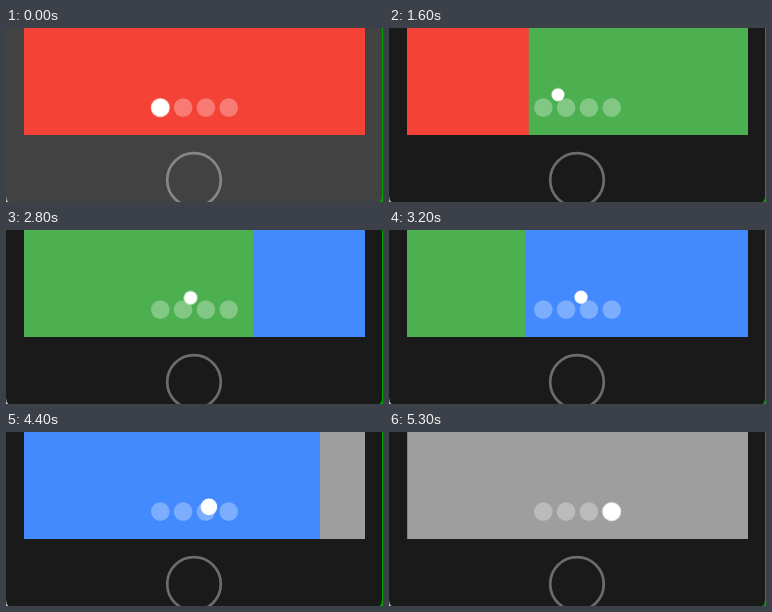
Animation of 377x174 px, one loop 5400 ms. Source, as an HTML page:

```html
<!DOCTYPE html>
<html lang="en">
<head>
<meta charset="utf-8">
<title>Page indicator</title>
<style>
  html, body { margin: 0; width: 100%; height: 100%; overflow: hidden; background: #1a1a1a; }
  svg { display: block; width: 377px; height: 174px; }
  #soft { filter: blur(.45px); }
</style>
</head>
<body>
<svg viewBox="0 0 377 174">
  <defs><clipPath id="screen"><rect x="18" y="-5" width="341" height="112"/></clipPath></defs>
  <rect width="188" height="174" fill="#c4c4c4"/>
  <rect x="188" width="189" height="174" fill="#00a400"/>
  <path id="body" d="M0 0H376V168Q376 172 373.5 174H2.5Q0 172 0 168Z" fill="#1a1a1a"/>
  <g id="soft">
    <g clip-path="url(#screen)"><g id="pages"></g></g>
    <g id="dots" fill="#fff" fill-opacity=".3"></g>
    <circle id="active" r="9.3" fill="#fff"/>
    <circle id="home" cx="188" cy="152" r="26.8" fill="none" stroke="#6c6c6c" stroke-width="2.7"/>
  </g>
</svg>
<script>
const LOOP = 5400, STEP = 100;
const PAGE_WIDTH = 341, DOT_X = 154.3, DOT_Y = 79.6, DOT_GAP = 22.8;
const LIFT = 18, SHRINK = 0.42;
const COLORS = ['#f44336', '#4caf50', '#448aff', '#9e9e9e'];

// Each swipe drags steadily up to `reach`, then settles on the next page.
const SWIPES = [
  { start: 665, release: 1600, reach: .643, end: 2000 },
  { start: 2396, release: 3200, reach: .654, end: 3800 },
  { start: 4190, release: 4900, reach: .447, end: 5330 }
];

const byId = id => document.getElementById(id);
const progress = (t, from, to) => Math.min(1, Math.max(0, (t - from) / (to - from)));
const easeOut = u => 1 - (1 - u) ** 2;

function add(parent, tag, attrs) {
  const el = document.createElementNS('http://www.w3.org/2000/svg', tag);
  for (const key in attrs) el.setAttribute(key, attrs[key]);
  byId(parent).append(el);
}

const pageAt = t => SWIPES.reduce((page, { start, release, reach, end }) =>
  page + reach * progress(t, start, release) + (1 - reach) * easeOut(progress(t, release, end)), 0);

// Holds each computed style for one step of the loop.
function play(id, styleAt) {
  const frames = [];
  for (let t = 0; t < LOOP; t += STEP) {
    frames.push({ ...styleAt(t), offset: t / LOOP, easing: 'step-end' });
  }
  frames.push({ ...styleAt(0), offset: 1 });
  byId(id).animate(frames, { duration: LOOP, iterations: Infinity });
}

const fade = (from, to) => t => {
  const v = Math.round(from + (to - from) * progress(t, 0, 300));
  return `rgb(${v}, ${v}, ${v})`;
};
const bodyTone = fade(66, 26), ringTone = fade(134, 108);

COLORS.forEach((fill, i) => {
  add('pages', 'rect', { x: 18 + i * PAGE_WIDTH, y: -5, width: PAGE_WIDTH + 1, height: 112, fill });
  add('dots', 'circle', { cx: DOT_X + i * DOT_GAP, cy: DOT_Y, r: 9.3 });
});

play('body', t => ({ fill: bodyTone(t) }));
play('home', t => ({ stroke: ringTone(t) }));
play('pages', t => ({ transform: `translate(${-PAGE_WIDTH * pageAt(t)}px, 0px)` }));
play('active', t => {
  const page = pageAt(t);
  const hop = 2 * Math.abs(page - Math.round(page));
  return {
    transform: `translate(${DOT_X + DOT_GAP * page}px, ${DOT_Y - LIFT * hop}px) scale(${1 - SHRINK * hop})`
  };
});
</script>
</body>
</html>
```
